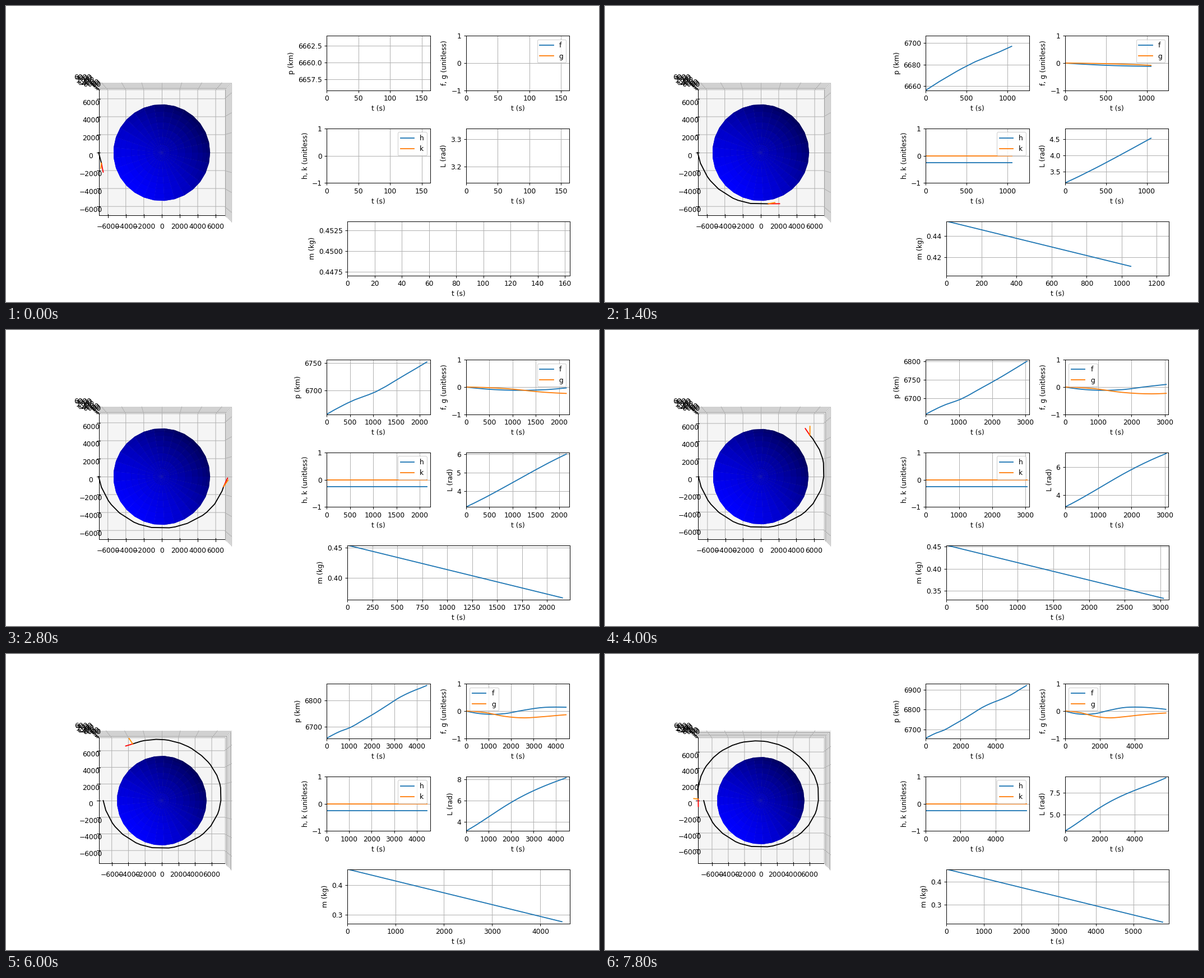
Recreate the animation shown at these times as a matplotlib script. Size 1058 px wide and 529 px high, loop 8 s.

```python
import numpy as np
import matplotlib.pyplot as plt
from matplotlib.animation import FuncAnimation

W, H = 1058, 529
FRAMES, INTERVAL = 40, 200
MU = 398600.0
INC = np.radians(28.5)
RADIUS = 0.8 * 6378
VEL_SCALE = 136

# Solver steps repeat in a cycle of three lengths.
steps = np.resize([215.5, 71.5, 157.2], FRAMES - 1)
time = np.concatenate([[0, 163.5], 163.5 + np.cumsum(steps)])
fine = np.linspace(0, time[-1], 3000)


def curve(*keys):
    """Smooth cubic through evenly spaced key values, on the fine time grid."""
    y = np.array(keys, float)
    slope = np.gradient(y, edge_order=2)
    pos = fine / fine[-1] * (len(y) - 1)
    i = np.minimum(pos.astype(int), len(y) - 2)
    s = pos - i
    return ((1 + 2 * s) * (1 - s) ** 2 * y[i] + s * (1 - s) ** 2 * slope[i]
            + s * s * (3 - 2 * s) * y[i + 1] + s * s * (s - 1) * slope[i + 1])


def sample(y):
    return np.interp(time, fine, y)


def tilt(x, y):
    return np.array([x, y * np.cos(INC), -y * np.sin(INC)])


# Equinoctial elements; the true longitude follows from the other ones.
p = curve(6655.9, 6680.2, 6698.2, 6725, 6752.2, 6781.5,
          6811, 6833.5, 6851.8, 6873.5, 6902, 6930)
f = curve(0, -0.112, -0.096, 0.03, 0.13, 0.145, 0.112, 0.05)
g = curve(0, -0.055, -0.192, -0.249, -0.208, -0.148, -0.1, -0.065)
L = np.full_like(fine, np.pi)
for i in range(len(fine) - 1):
    w = 1 + f[i] * np.cos(L[i]) + g[i] * np.sin(L[i])
    L[i + 1] = L[i] + (fine[1] - fine[0]) * np.sqrt(MU * p[i]) * (w / p[i]) ** 2
thrust = np.array([sample(curve(-250, 720, 60, -400, -520)),
                   sample(curve(-650, 250, 965, 690, 60)),
                   np.zeros_like(time)])

p, f, g, L = map(sample, (p, f, g, L))
h = np.full_like(time, -np.tan(INC / 2))
k = np.zeros_like(time)
m = 0.4536 - 3.99e-5 * time

r = p / (1 + f * np.cos(L) + g * np.sin(L))
pos = tilt(r * np.cos(L), r * np.sin(L))
speed = np.sqrt(MU / p)
vel = VEL_SCALE * tilt(-speed * (g + np.sin(L)), speed * (f + np.cos(L)))

fig = plt.figure(figsize=(12, 6), dpi=W / 12)


def place(left, top, width, height, **kw):
    return fig.add_axes([left / W, 1 - (top + height) / H, width / W, height / H], **kw)


def panel(left, top, ylabel, names=(), width=184.6):
    ax = place(left, top, width, 97.2)
    ax.set_xlabel("t (s)")
    ax.set_ylabel(ylabel)
    ax.grid(True)
    lines = [ax.plot([], [], label=n)[0] for n in names or [None]]
    if names:
        ax.set_ylim(-1, 1)
        ax.legend()
    return ax, lines


SIDE = 397.5
space = place(272.5 - SIDE / 2, 267.4 - SIDE / 2, SIDE, SIDE, projection="3d")
space.view_init(90, -90)
space.set_box_aspect((1, 1, 1))
u, v = np.mgrid[0:2 * np.pi:30j, 0:np.pi:20j]
space.plot_surface(RADIUS * np.cos(u) * np.sin(v), RADIUS * np.sin(u) * np.sin(v),
                   RADIUS * np.cos(v), color="b")
trail, = space.plot([], [], [], color="black")
vel_arrow, = space.plot([], [], [], color="red")
thrust_arrow, = space.plot([], [], [], color="darkorange")

COL1, COL2 = 572.3, 820.9
ROW1, ROW2, ROW3 = 53.4, 219, 384.6
panels = [
    (*panel(COL1, ROW1, "p (km)"), [p]),
    (*panel(COL2, ROW1, "f, g (unitless)", "fg"), [f, g]),
    (*panel(COL1, ROW2, "h, k (unitless)", "hk"), [h, k]),
    (*panel(COL2, ROW2, "L (rad)"), [L]),
    (*panel(609.2, ROW3, "m (kg)", width=396.3), [m]),
]


def update(n):
    # Panels lag one step behind their limits and the trail.
    now = n + 1
    for ax, lines, data in panels:
        for line, y in zip(lines, data):
            line.set_data(time[:now], y[:now])
        ax.set_xlim(0, time[now])
        if len(data) == 1:
            ax.set_ylim(*sorted((data[0][0], data[0][now])))

    trail.set_data_3d(*pos[:, :now + 1])
    base = pos[:, now]
    for arrow, vec in ((vel_arrow, vel), (thrust_arrow, thrust)):
        arrow.set_data_3d(*np.array([base, base + vec[:, now]]).T)
    lim = 1.05 * np.abs(pos[:, :now + 1]).max()
    space.set(xlim=(-lim, lim), ylim=(-lim, lim), zlim=(-lim, lim))


anim = FuncAnimation(fig, update, frames=FRAMES, interval=INTERVAL, repeat=True)
plt.show()
```
